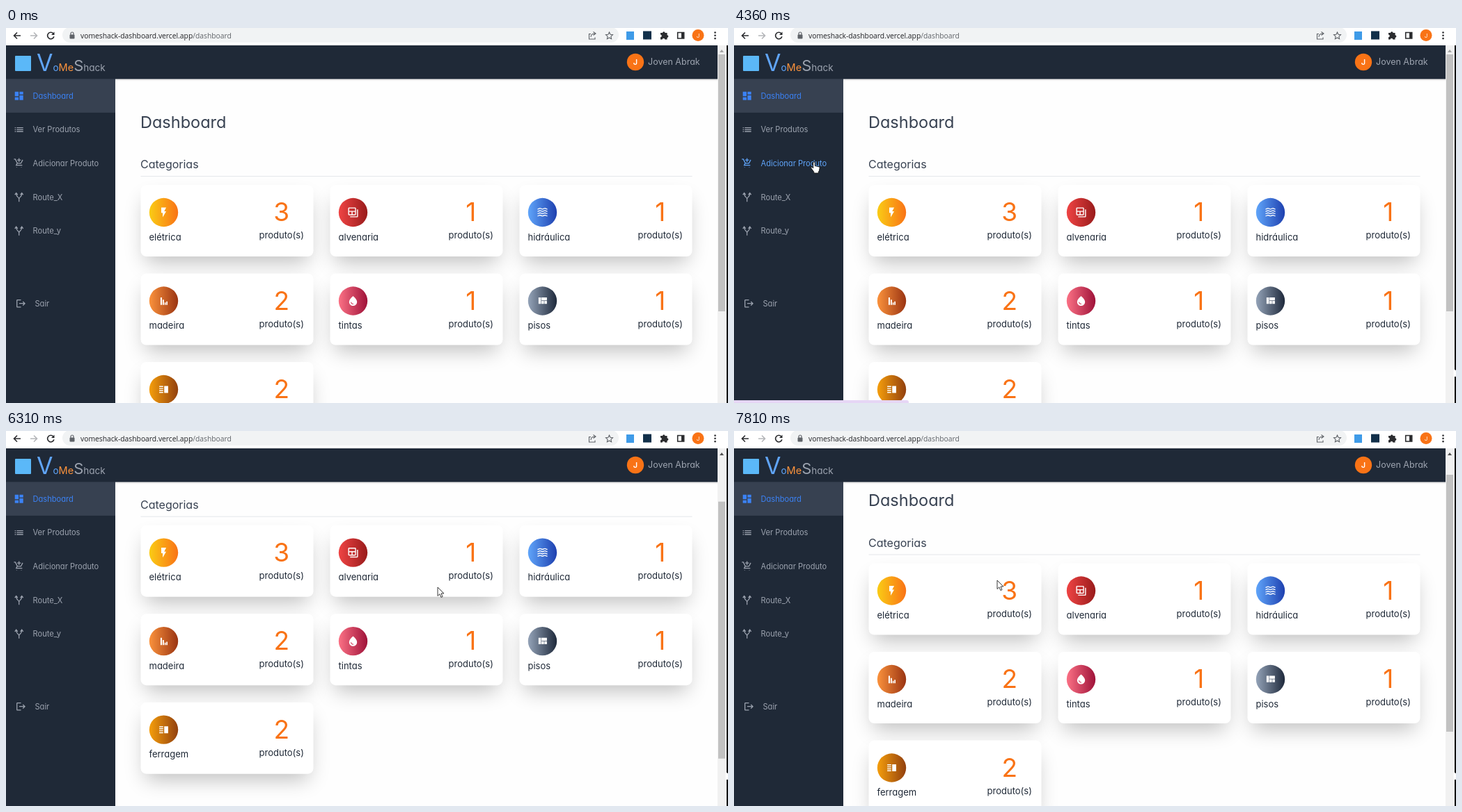
Recreate the animation shown at these times as an HTML page. Size 1037 by 540 pixels, loop 8 s.

```html
<!DOCTYPE html>
<html lang="pt">
<head>
<meta charset="utf-8">
<style>
html, body { margin: 0; width: 100%; height: 100%; overflow: hidden; background: #fff; }
svg { display: block; }
text { font-family: Inter, "Open Sans", sans-serif; font-feature-settings: "cv11"; }
.url { font-family: "Open Sans", "Noto Sans", sans-serif; font-size: 10.3px; }
</style>
</head>
<body>
<svg id="stage" width="1037" height="540" viewBox="0 0 1037 540"></svg>
<script>
const LOOP = 8000, HOST = 'vomeshack-dashboard.vercel.app';
const ORANGE = '#f97316', NAVY = '#1f2937', GRAY = '#9ca3af', INK = '#374151';

const wave = y => `M2 ${y}c3 0 3-1.6 5-1.6s3 1.6 5 1.6 3-1.6 5-1.6 2 1.6 5 1.6`;
const ICONS = {
  bolt: 'M7 2v11h3v9l7-12h-4l4-8z',
  table: 'M20 6v14H6v2h14c1.1 0 2-.9 2-2V6zM16 2H4c-1.1 0-2 .9-2 2v12c0 1.1.9 2 2 2h12c1.1 0 2-.9 2-2V4c0-1.1-.9-2-2-2zM9 16H4v-5h5zm7 0h-5v-5h5zm0-7H4V4h12z',
  waves: [5.4, 10, 14.6, 19.2].map(wave).join(''),
  bars: 'M5.5 5h3v15h-3zM9.8 9.5h2.7V20H9.8zM13.8 15h2.4v5h-2.4zM17.3 13h2.4v7h-2.4z',
  drop: 'M12 2c-5.3 4.5-8 8.5-8 11.8C4 18.800 7.800 22 12 22s8-3.200 8-8.200C20 10.500 17.300 6.500 12 2zM7.800 14c.4 0 .7.3.8.6.4 2.200 2.300 3 3.600 2.900 1 0 1 1.500 0 1.500-2.100.1-4.600-1.100-5.200-4.100C7 14.400 7.400 14 7.800 14z',
  quilt: 'M10 18h5v-6h-5zM4 18h5V5H4zM16 18h5v-6h-5zM10 5v6h11V5z',
  split: 'M3 15h8v-2H3zM3 19h8v-2H3zM3 11h8V9H3zM3 5v2h8V5zM13 5h8v14h-8z',
  dash: 'M3 13h8V3H3zM3 21h8v-6H3zM13 21h8V11h-8zM13 3v6h8V3z',
  list: 'M3 13h2v-2H3zM3 17h2v-2H3zM3 9h2V7H3zM7 13h14v-2H7zM7 17h14v-2H7zM7 7v2h14V7z',
  cart: 'M12 1v8M8 5h8M1 3h3l4.500 9h7.500l4-7.500M8 12l-2 4h13M7 19.500v1M17 19.500v1',
  fork: 'M12 22v-6c0-4-6-4-6-11M12 16c0-4 6-4 6-11M3 7l3-4 3 4M15 7l3-4 3 4',
  exit: 'M17 7l-1.400 1.400L18.200 11H8v2h10.200l-2.600 2.600L17 17l5-5zM4 5h8V3H4c-1.100 0-2 .9-2 2v14c0 1.100.9 2 2 2h8v-2H4z'
};
const STROKED = ['waves', 'cart', 'fork'];

const CATEGORIES = [
  ['elétrica', 'bolt', 3, '#facc15', '#f97316'],
  ['alvenaria', 'table', 1, '#ef4444', '#991b1b'],
  ['hidráulica', 'waves', 1, '#60a5fa', '#1e40af'],
  ['madeira', 'bars', 2, '#fb923c', '#9a3412'],
  ['tintas', 'drop', 1, '#fb7185', '#9f1239'],
  ['pisos', 'quilt', 1, '#94a3b8', '#1e293b'],
  ['ferragem', 'split', 2, '#f59e0b', '#92400e']
];
const MENU = [['Dashboard', 'dash'], ['Ver Produtos', 'list'], ['Adicionar Produto', 'cart'],
  ['Route_X', 'fork'], ['Route_y', 'fork']];
const PATHS = ['dashboard', 'produtos', 'adicionarproduto'];
const STATUS = [220, 214, 251, 214, 214];   // link preview widths

const rect = (x, y, w, h, fill, more = '') =>
  `<rect x="${x}" y="${y}" width="${w}" height="${h}" fill="${fill}" ${more}/>`;
const disc = (x, y, r, fill) => `<circle cx="${x}" cy="${y}" r="${r}" fill="${fill}"/>`;
const text = (x, y, size, fill, str, more = '') =>
  `<text x="${x}" y="${y}" font-size="${size}" fill="${fill}" ${more}>${str}</text>`;
const line = (d, color, w, more = '') =>
  `<path d="${d}" fill="none" stroke="${color}" stroke-width="${w}" ${more}/>`;
const mid = 'text-anchor="middle"';

function icon(name, cx, cy, size, color) {
  const paint = STROKED.includes(name)
    ? `fill="none" stroke="${color}" stroke-width="1.9"` : `fill="${color}"`;
  return `<path d="${ICONS[name]}" ${paint} fill-rule="evenodd"
    transform="translate(${cx - size / 2} ${cy - size / 2}) scale(${size / 24})"/>`;
}

function heading(y, str) {
  return text(193, y, 16, INK, str) + rect(193.5, y + 11, 792, 1, '#e5e7eb');
}

function card([name, glyph, count], i) {
  const x = 193.5 + i % 3 * 272, y = 226 + Math.floor(i / 3) * 127.5;
  return rect(x + 7, y + 22, 234, 89, '#000', 'opacity=".25" filter="url(#soft)"') +
    rect(x, y, 248, 103, '#fff', 'rx="8"') +
    disc(x + 33, y + 39.500, 20.700, `url(#g${i})`) + icon(glyph, x + 33, y + 39.500, 17, '#fff') +
    text(x + 12, y + 79.500, 13, NAVY, name) +
    text(x + 202.300, y + 52, 37, ORANGE, count, mid) +
    text(x + 202.300, y + 77, 13, NAVY, 'produto(s)', mid);
}

function tile([name, glyph], i) {
  const x = 194 + i % 4 * 204.200, y = 226.500 + Math.floor(i / 4) * 162.500;
  return rect(x + 2, y + 8, 174.500, 132.500, '#000', 'opacity=".2" filter="url(#faint)"') +
    rect(x, y, 178.500, 136.500, `url(#g${i})`, 'rx="7"') +
    icon(glyph, x + 89.200, y + 50.500, 29, '#fff') +
    text(x + 89.200, y + 94.500, 19.300, '#fff', name, mid + ' font-weight="500"');
}

const title = str => text(193, 143.500, 23.500, INK, str);

function pages() {
  const views = [
    title('Dashboard') + heading(202, 'Categorias') + CATEGORIES.map(card).join('') +
      heading(661, 'Gráficos') + text(193, 698, 13, NAVY, 'Graficos'),
    title('Ver Produtos') + heading(202, 'Selecione a categoria que deseja ver.') +
      CATEGORIES.map(tile).join(''),
    title('Adicionar Produto')
  ];
  return views.map(v => `<g class="page">${v}</g>`).join('');
}

function toolbar() {
  const dark = '#2b2c2f', soft = '#5f6368';
  return rect(0, 0, 1037, 25, '#fff') + rect(81, -1, 799, 22, '#f1f3f4', 'rx="11"') +
    line('M21 11H11.500M16 6.500L11.500 11l4.500 4.500', dark, 1.600) +
    line('M35 11h9.500M40 6.500l4.500 4.500-4.500 4.500', '#b4b6b9', 1.600) +
    line('M68 8a4.700 4.700 0 1 0 .9 4.200', dark, 1.600) + `<path d="M69.500 5.500v4.500H65z" fill="${dark}"/>` +
    rect(91.500, 9.500, 7, 6, soft, 'rx="1"') + line('M93 10V8a2 2 0 0 1 4 0v2', soft, 1.200) +
    `<text class="url" x="107" y="14.500" fill="#202124">${HOST}<tspan id="path" fill="${soft}"></tspan></text>` +
    line('M840 8.500h-2.500v7.500h8.500v-2.500M840 13c0-3.500 2.500-5 6-5M843.500 5.500L847 8l-3.500 2.500', soft, 1.100) +
    line('M866.500 6l1.500 3.300 3.500.4-2.600 2.400.7 3.600-3.100-1.800-3.100 1.800.7-3.600-2.600-2.400 3.500-.4z', soft, 1.100) +
    rect(891, 5, 11, 12, '#3f9be8') + rect(915, 4.500, 12, 12, '#12304a') +
    `<path d="M940 7h3a1.800 1.800 0 1 1 3.600 0h3v3.300a1.800 1.800 0 1 1 0 3.600V16.500h-3.300a1.800 1.800 0 0 0-3.600 0H940v-3.300a1.800 1.800 0 0 0 0-3.600z" fill="${dark}"/>` +
    line('M964.700 6.500h9v8.500h-9z', dark, 1.600) + rect(970, 6, 4, 9, dark) +
    disc(994, 10.500, 8.500, ORANGE) + text(994, 13.500, 8, '#fff', 'J', mid) +
    [6.500, 10.800, 15.100].map(y => disc(1018.500, y, 1.300, dark)).join('');
}

function header() {
  const part = (size, fill, str) => `<tspan font-size="${size}" fill="${fill}">${str}</tspan>`;
  return rect(157, 73, 865, 3, '#000', 'opacity=".06"') + rect(0, 25, 1022, 48.500, NAVY) +
    rect(13, 40, 23, 22, '#5bb8f8', 'rx="1"') +
    `<text x="44" y="62">${part(34, '#60a5fa', 'V')}${part(13.500, '#60a5fa', 'o')}${
      part(14.500, '#fb923c', 'Me')}${part(22, GRAY, 'S')}${part(13.500, GRAY, 'hack')}</text>` +
    disc(904, 49, 12.200, ORANGE) + text(904, 53, 11, '#fff', 'J', mid + ' font-weight="600"') +
    text(922, 53, 12.500, GRAY, 'Joven Abrak');
}

function sidebar() {
  return rect(0, 73, 157, 467, NAVY) +
    `<rect id="active" width="157" height="48.600" fill="${INK}"/>` +
    MENU.map(([name, glyph], i) => {
      const y = 97.700 + i * 48.600;
      return `<g class="item">${icon(glyph, 18.700, y, 16, 'currentColor')}${
        text(38.500, y + 4, 11.100, 'currentColor', name)}</g>`;
    }).join('') +
    icon('exit', 21.500, 396.700, 15.500, GRAY) + text(41.500, 400.700, 11.100, GRAY, 'Sair');
}

const gradients = CATEGORIES.map(([, , , a, b], i) =>
  `<linearGradient id="g${i}"><stop stop-color="${a}"/><stop offset="1" stop-color="${b}"/></linearGradient>`).join('');
const blur = (id, s) => `<filter id="${id}" x="-40%" y="-80%" width="180%" height="260%">
  <feGaussianBlur stdDeviation="${s}"/></filter>`;

const $ = id => document.getElementById(id);
$('stage').innerHTML = `<defs>${gradients}${blur('soft', 15)}${blur('faint', 4)}</defs>
  ${rect(0, 0, 1037, 540, '#fefefe')}<g id="content">${pages()}</g>
  ${toolbar()}${header()}${sidebar()}
  ${rect(1022, 25, 13, 515, '#f1f1f1')}<path id="up" d="M1025 35l3-4 3 4z"/>
  <rect id="thumb" x="1023" width="10" fill="#c1c1c1"/>
  ${rect(1035, 25, 2, 515, '#000')}
  <path id="notch" d="M1033.500 491l3.500 2v9h-3.500z" fill="#fff"/>
  <path id="status" fill="#e6d6f5"/>
  <g id="cursor">
    <path class="shape" d="M0 0v12.500l2.900-2.700 2 4.700 2.100-.9-2-4.600h3.900z" fill="#fff" stroke="#222" stroke-width=".9"/>
    <path class="shape" d="M-1.300 1c0-1.700 2.600-1.700 2.600 0v4.500l5.500 1.300c1 .3 1.400 1 1.300 2l-.8 4-1 1.200v2H-.2v-1.700l-4-5.500c-.6-1.200.8-2 1.800-1.100l1.100 1.200z" fill="#fff" stroke="#111" stroke-width=".9"/>
    <path class="shape" d="M-3-7.500h2q1 0 1 1 0-1 1-1h2M0-6.500v13M-3 7.500h2q1 0 1-1 0 1 1 1h2" fill="none" stroke="#ddd"/>
  </g>`;

const pageEls = document.querySelectorAll('.page');
const itemEls = document.querySelectorAll('.item');
const shapeEls = document.querySelectorAll('.shape');
const show = (el, on) => el.style.display = on ? '' : 'none';

// [time, x, y]
const MOVES = [[390, 1034, 498], [1130, 782, 162], [1370, 782, 162], [1740, 93, 62], [2130, 98, 150],
  [3650, 98, 150], [3880, 96, 102], [4200, 96, 102], [4350, 115, 193], [5130, 115, 193],
  [5400, 120, 104], [5560, 121, 112], [5640, 123, 122], [5960, 621, 210], [6100, 621, 210],
  [6760, 617, 272], [6830, 617, 272], [7620, 368, 215], [7670, 368, 215], [7810, 378, 215]];
// [time, offset]
const SCROLLS = [[5960, 0], [6050, 61], [6110, 61], [6740, 183], [6830, 183], [7620, 35.500]];
// [time, page]
const VISITS = [[0, 0], [2770, 1], [3920, 0], [4600, 2], [5480, 0]];

function at(keys, t) {
  const i = keys.findIndex(k => k[0] > t);
  if (i === 0) return keys[0].slice(1);
  if (i < 0) return keys[keys.length - 1].slice(1);
  const a = keys[i - 1], b = keys[i], p = (t - a[0]) / (b[0] - a[0]), e = p * p * (3 - 2 * p);
  return a.slice(1).map((v, j) => v + (b[j + 1] - v) * e);
}

function draw(t) {
  const [x, y] = at(MOVES, t), [scroll] = at(SCROLLS, t);
  const page = VISITS.filter(v => v[0] <= t).pop()[1];
  const row = x < 157 && y >= 73 ? Math.floor((y - 73) / 48.600) : -1;
  const overLogo = x < 141 && y < 73;

  pageEls.forEach((el, i) => show(el, i === page));
  $('content').setAttribute('transform', `translate(0 ${-scroll})`);
  $('path').textContent = '/' + PATHS[page];
  $('active').setAttribute('y', 73.300 + page * 48.600);
  itemEls.forEach((el, i) => el.setAttribute('color', i === row ? '#60a5fa' : i === page ? '#3b82f6' : GRAY));

  $('thumb').setAttribute('y', 38 + scroll * .705);
  $('thumb').setAttribute('height', page ? 491 : 370);
  $('up').setAttribute('fill', scroll ? '#505050' : '#a3a3a3');

  show($('status'), row >= 0 && t >= 2200);
  if (row >= 0) $('status').setAttribute('d', `M0 536H${STATUS[row] - 3}q3 0 3 3v1H0z`);

  show($('notch'), t >= 450);
  show($('cursor'), t >= 390);
  $('cursor').setAttribute('transform', `translate(${x} ${y})`);
  const shape = row >= 0 ? 1 : overLogo ? 2 : 0;
  shapeEls.forEach((el, i) => show(el, i === shape));
}

const start = performance.now();
function frame() {
  draw((performance.now() - start) % LOOP);
  requestAnimationFrame(frame);
}
frame();
</script>
</body>
</html>
```
